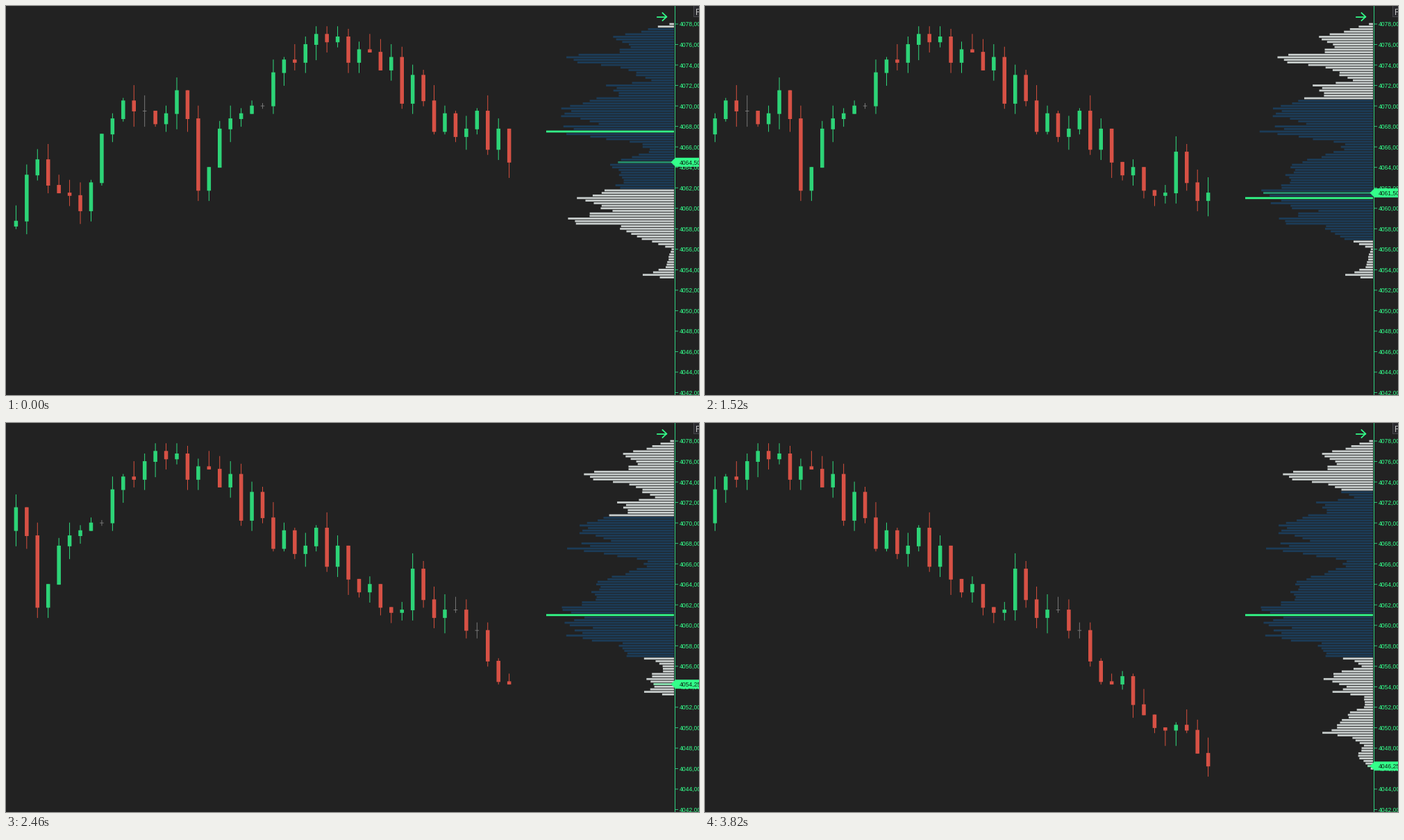
Animation of 998x561 px, one loop 3840 ms. Source, as a matplotlib script:

```python
import numpy as np
import matplotlib.pyplot as plt
from matplotlib.animation import FuncAnimation
from matplotlib.collections import PolyCollection
from matplotlib.colors import to_rgba_array
from matplotlib.patches import Polygon, Rectangle

W, H, DPI = 998, 561, 64
LOOP, TICK_MS = 3840, 10
VISIBLE = 47

BACK, MINT, AXIS = "#222222", "#33ff8a", "#2fd081"
UP, UP_WICK = "#2dd477", "#31ea85"
DOWN, DOWN_WICK = "#d75145", "#e6533f"
FLAT, OUTER, INNER = "#7d7d7d", "#c9cfce", "#1c3c58"
CURRENT = (0.2, 1, 0.54, 0.42)

# Times at which a new candle arrives.
ARRIVALS = [120, 240, 490, 640, 790, 940, 1090, 1370, 1520, 1640, 1790, 1910,
            2190, 2340, 2460, 2610, 2730, 2850, 3000, 3150, 3400, 3550, 3700,
            3820]
STEPS = len(ARRIVALS) + 1

# Prices are counted in quarter points below TOP_PRICE.
TOP_PRICE = 4078
ROWS = 129
TOP_Y, PITCH = 26, 3.691
PIXEL = 0.92
rng = np.random.default_rng(7)

CLOSE = np.array([
    77, 59, 53, 63, 66, 67, 73, 62, 43, 37, 30, 34, 34, 39, 35, 26, 37, 65,
    56, 41, 37, 35, 32, 32, 19, 14, 15, 8, 4, 7, 5, 15, 10, 11, 18, 13, 31,
    20, 30, 42, 35, 44, 41, 34, 49, 41, 54, 59, 56, 65, 67, 66, 50, 62, 69,
    66, 66, 74, 74, 86, 94, 95, 92, 103, 107, 112, 113, 111, 113, 122, 127])

# Each candle opens at the last close; the wicks are random.
OPEN = np.append(79, CLOSE[:-1])
BODY_TOP, BODY_END = np.minimum(OPEN, CLOSE), np.maximum(OPEN, CLOSE)
HIGH = np.maximum(BODY_TOP - rng.integers(0, 7, CLOSE.size), 0)
LOW = BODY_END + rng.integers(0, 7, CLOSE.size)

BAR_RIGHT, BAR_MAX, BAR_HEIGHT = 962, 184, 3 * PIXEL
FIRST_PEAK, LAST_PEAK, PEAK_GROWTH = 42, 68, 1.195

# (row, volume) points of the profile before and after the new candles.
BEFORE = [(0, 7), (5, 82), (9, 68), (11, 79), (12, 150), (15, 140), (17, 80),
          (22, 33), (24, 95), (28, 88), (32, 152), (36, 160), (39, 105),
          (40, 150), (43, 176), (44, 117), (47, 47), (50, 36), (55, 100),
          (59, 74), (64, 80), (68, 132), (73, 92), (76, 158), (78, 132),
          (79, 82), (83, 53), (88, 4), (95, 12), (98, 42), (100, 0)]
AFTER = [(47, 47), (49, 53), (52, 85), (55, 143), (59, 133), (63, 148),
         (66, 195), (69, 150), (71, 195), (73, 145), (76, 192), (79, 95),
         (84, 76), (86, 33), (88, 22), (91, 65), (93, 85), (96, 45), (98, 65),
         (100, 15), (104, 16), (106, 38), (113, 67), (114, 98), (116, 40),
         (119, 17), (123, 28), (128, 4), (129, 0)]


def profile(points, grain, peak_row, peak):
    rough = np.interp(np.arange(ROWS), *zip(*points)) * grain
    rough = np.minimum(rough, 0.95 * peak)
    rough[peak_row] = peak
    return rough


def volumes():
    """Each new candle moves the rows around its body to the later profile."""
    grain = rng.uniform(0.88, 1.08, ROWS)
    before = profile(BEFORE, grain, FIRST_PEAK, BAR_MAX)
    after = profile(AFTER, grain, LAST_PEAK, BAR_MAX * PEAK_GROWTH)
    rows = np.arange(ROWS)
    hit = ((BODY_TOP[VISIBLE:, None] - 3 <= rows)
           & (rows <= BODY_END[VISIBLE:, None] + 3))
    done = np.vstack([np.zeros(ROWS), hit.cumsum(axis=0)])
    done /= np.maximum(done[-1], 1)
    ease = done * done * (3 - 2 * done)
    return before + np.maximum(after - before, 0) * ease


VOLUME = volumes()


def value_area(volume):
    """Grow from the peak by pairs of rows until 70% of volume is inside."""
    first = last = volume.argmax()
    while volume[first:last + 1].sum() < 0.7 * volume.sum():
        above = volume[max(first - 2, 0):first].sum()
        below = volume[last + 1:last + 3].sum()
        if above > below:
            first = max(first - 2, 0)
        else:
            last += 2
    return first, last


def row_y(n):
    return TOP_Y + PITCH * n


def box(x0, y0, x1, y1):
    return [(x0, y0), (x1, y0), (x1, y1), (x0, y1)]


def price_text(n):
    return f"{TOP_PRICE - n / 4:.2f}".replace(".", ",")


def column(cx, width, top, bottom):
    return box(cx - width / 2, row_y(top) - PIXEL / 2,
               cx + width / 2, row_y(bottom) + PIXEL / 2)


def candle_shapes(step):
    for slot in range(VISIBLE):
        i = step + slot
        cx = 14.4 + 15.44 * slot
        if OPEN[i] == CLOSE[i]:
            body, wick = FLAT, FLAT
        elif CLOSE[i] < OPEN[i]:
            body, wick = UP, UP_WICK
        else:
            body, wick = DOWN, DOWN_WICK
        yield column(cx, PIXEL, HIGH[i], LOW[i]), wick
        yield column(cx, 6 * PIXEL, BODY_TOP[i], BODY_END[i]), body


def profile_shapes(step):
    volume = VOLUME[step]
    widths = volume * BAR_MAX / volume.max()
    peak = volume.argmax()
    first, last = value_area(volume)
    current = CLOSE[step + VISIBLE - 1]
    for n in np.flatnonzero(widths >= 1):
        y = row_y(n) - BAR_HEIGHT / 2
        bar = box(BAR_RIGHT - widths[n], y, BAR_RIGHT, y + BAR_HEIGHT)
        color = MINT if n == peak else INNER if first <= n <= last else OUTER
        yield bar, color
        if n == current and n != peak:
            yield bar, CURRENT


def scene(step):
    verts, colors = zip(*candle_shapes(step), *profile_shapes(step))
    return verts, to_rgba_array(list(colors))


fig = plt.figure(figsize=(W / DPI, H / DPI), dpi=DPI, facecolor=BACK)
ax = fig.add_axes([0, 0, 1, 1])
ax.set_xlim(0, W)
ax.set_ylim(H, 0)
ax.axis("off")


def label(x, y, text, px, color, z=3):
    return ax.text(x, y, text, family="Liberation Sans", size=px * 72 / DPI,
                   color=color, va="baseline", zorder=z)


def fill(x0, y0, x1, y1, color):
    ax.add_patch(Rectangle((x0, y0), x1 - x0, y1 - y0, fc=color, lw=0,
                           snap=False, zorder=2))


# Price axis
fill(963, 0, 964, H, AXIS)
for n in range(0, 145, 8):
    y = row_y(n)
    fill(964, y - PIXEL / 2, 968, y + PIXEL / 2, AXIS)
    label(970, y + 3.3, price_text(n), 8.5, MINT)

# Corner button and arrow
fill(990, 0, W, 16, "#47474c")
fill(991, 0, W, 15, "#2a2a2e")
label(993, 12.5, "F", 12, "#c4c4c4")
stroke = dict(color=MINT, lw=1.7 * 72 / DPI, solid_joinstyle="miter")
ax.plot([938, 951], [15.5, 15.5], **stroke)
ax.plot([945.5, 951.3, 945.5], [10, 15.5, 21], **stroke)

chart = PolyCollection([], lw=0, snap=False, zorder=1)
ax.add_collection(chart, autolim=False)
tag = Polygon([(0, 0)], closed=True, fc=MINT, lw=0, zorder=4)
ax.add_patch(tag)
tag_text = label(970, 0, "", 8.5, "#0c2417", z=5)

SCENES = [scene(step) for step in range(STEPS)]


def draw(frame):
    step = np.searchsorted(ARRIVALS, frame * TICK_MS, side="right")
    verts, colors = SCENES[step]
    chart.set_verts(verts)
    chart.set_facecolor(colors)
    n = CLOSE[step + VISIBLE - 1]
    y = row_y(n)
    tag.set_xy([(957.5, y), (964, y - 6.5), (W, y - 6.5), (W, y + 6.5),
                (964, y + 6.5)])
    tag_text.set_text(price_text(n))
    tag_text.set_y(y + 3.3)
    return chart, tag, tag_text


anim = FuncAnimation(fig, draw, frames=LOOP // TICK_MS, interval=TICK_MS,
                     repeat=True, repeat_delay=0)
plt.show()
```
